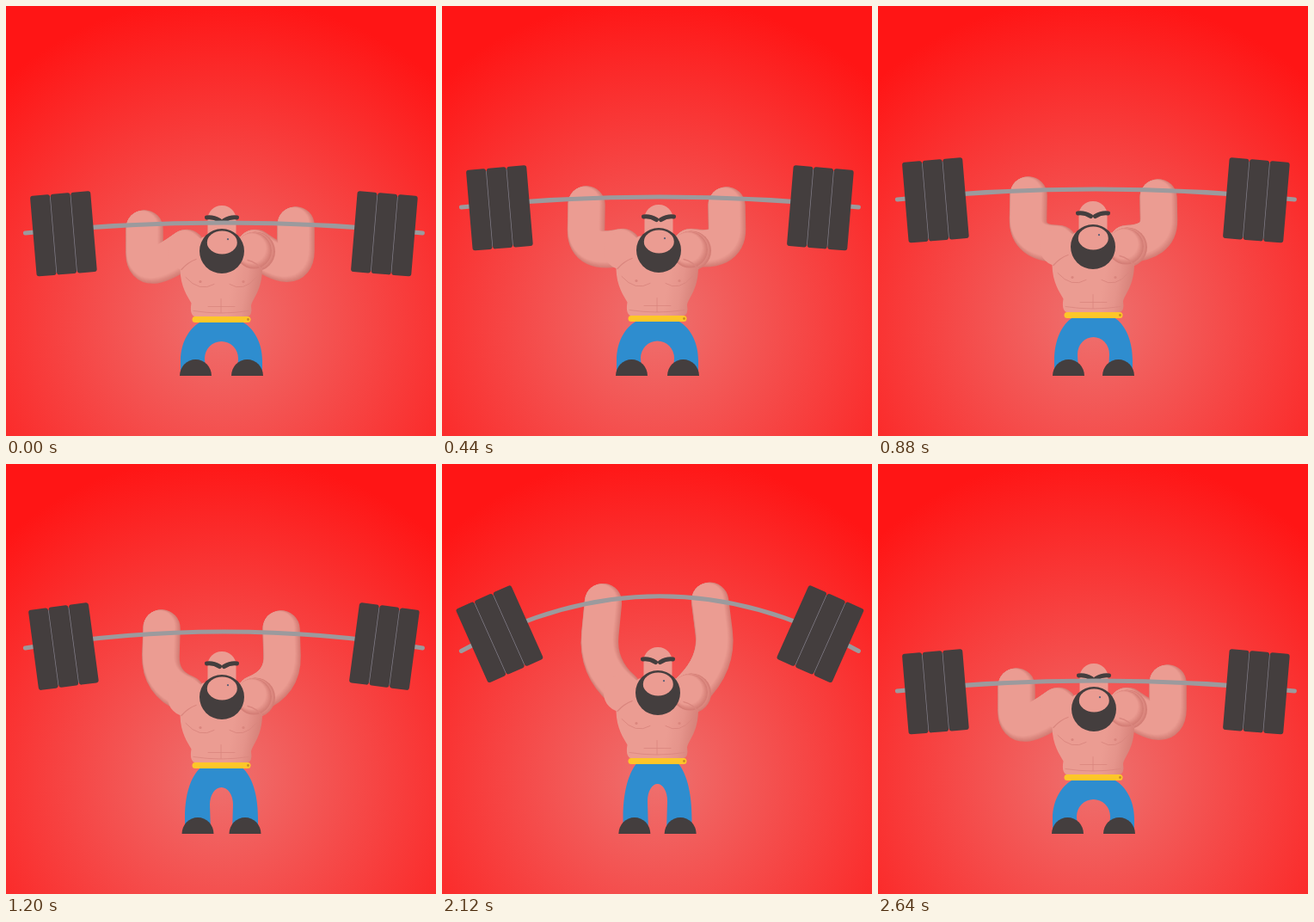
Animation of 500 by 500 pixels, one loop 2.68 s. Source, as an HTML page with a canvas:

```html
<!DOCTYPE html>
<html lang="en">
<head>
<meta charset="utf-8">
<title>Weightlifter</title>
<style>
html, body { margin: 0; width: 100%; height: 100%; overflow: hidden; background: #ff1616; }
canvas { display: block; width: 500px; height: 500px; }
</style>
</head>
<body>
<canvas id="stage" width="500" height="500"></canvas>
<script>
const ctx = document.getElementById('stage').getContext('2d');
const LOOP = 2680, STEP = 40;
const DARK = '#443e3e', BLUE = '#2e8dcf', STEEL = '#9c9a9d', YELLOW = '#fdc629';
const SKIN = [235, 156, 146], SHADE = [211, 125, 117];
const BAR_X = 253.4, BAR_HALF = 231;

// belt, bar middle, bar end, left hand xy, left elbow xy, right hand xy, right elbow xy,
// thigh outer x, thigh inner x, crotch y, foot x, head x
const squat = [364.5, 252, 264, 161, 259, 161, 317, 337, 255, 337, 315, 203, 231, 390, 220.5, 251];
const press = [363.5, 222, 234, 168, 231, 167, 290, 331, 232, 332, 287, 203, 231, 389.5, 220.5, 252];
const strain = [359.5, 213, 225, 175, 220, 174, 276, 326, 223, 327, 275, 205, 232, 385, 221.5, 250];
const rise = [350.5, 195, 214, 181, 191, 179, 255, 320, 192, 322, 255, 208, 237, 376, 223, 251];
const lockout = [344.5, 148, 215, 189, 155, 181, 232, 310, 154, 320, 228, 211, 239.5, 371, 224, 251];
const drop = [360, 233, 253, 166, 239, 166, 299, 333, 234, 333, 296, 204.5, 232, 385.5, 221.5, 251];

const keys = [[0, squat], [440, press], [880, strain], [1200, rise], [1600, lockout],
  [2080, lockout], [2320, drop], [2640, squat], [LOOP, squat]];

const rgb = c => `rgb(${c.map(Math.round)})`;
const mix = (a, b, k) => a.map((v, i) => v + (b[i] - v) * k);

// Monotone cubic interpolation through the key poses
function slope(i, n) {
  if (i === 0 || i === keys.length - 1) return 0;
  const secant = j => (keys[j + 1][1][n] - keys[j][1][n]) / (keys[j + 1][0] - keys[j][0]);
  const a = secant(i - 1), b = secant(i);
  return a * b > 0 ? 2 * a * b / (a + b) : 0;
}

function poseAt(t) {
  let i = 0;
  while (i < keys.length - 2 && t >= keys[i + 1][0]) i++;
  const [t0, a] = keys[i], [t1, b] = keys[i + 1];
  const h = t1 - t0, u = (t - t0) / h, v = 1 - u;
  return a.map((p, n) =>
    p * (1 + 2 * u) * v * v + b[n] * u * u * (3 - 2 * u) +
    h * (slope(i, n) * u * v * v - slope(i + 1, n) * u * u * v));
}

function ellipse(x, y, rx, ry, color) {
  ctx.fillStyle = color;
  ctx.beginPath();
  ctx.ellipse(x, y, rx, ry, 0, 0, Math.PI * 2);
  ctx.fill();
}

function box(x, y, w, h, r, color) {
  ctx.fillStyle = color;
  ctx.beginPath();
  ctx.roundRect(x, y, w, h, r);
  ctx.fill();
}

function strokePath(d, width, color) {
  ctx.lineWidth = width;
  ctx.strokeStyle = color;
  ctx.stroke(new Path2D(d));
}

// Repeats a shape slightly smaller and towards the light for a soft lower-right edge
function shaded(draw) {
  for (let i = 0; i <= 7; i++) {
    const inset = i * 0.55;
    ctx.save();
    ctx.translate(-inset * 0.7, -inset * 0.7);
    draw(inset, rgb(mix(SHADE, SKIN, i / 7)));
    ctx.restore();
  }
}

function background() {
  const g = ctx.createRadialGradient(250, 364, 0, 250, 364, 375);
  g.addColorStop(0, '#ee716f');
  g.addColorStop(1, '#ff1515');
  ctx.fillStyle = g;
  ctx.fillRect(0, 0, 500, 500);
}

function legs(belt, outer, inner, crotch, foot) {
  const m = x => 501 - x;
  const rx = 250.5 - inner;
  ctx.fillStyle = BLUE;
  ctx.fill(new Path2D(`M226 ${belt + 3}
    C${outer + 10} ${belt + 10} ${outer} ${belt + 27} ${outer} 412 V428 H${inner + 1}
    L${inner} ${crotch + 20} A${rx} 20 0 0 1 ${m(inner)} ${crotch + 20}
    L${m(inner) - 1} 428 H${m(outer)} V412
    C${m(outer)} ${belt + 27} ${m(outer) - 10} ${belt + 10} 275 ${belt + 3}Z`));
  ctx.fillStyle = DARK;
  for (const x of [foot, m(foot)]) {
    ctx.beginPath();
    ctx.ellipse(x, 430, 18.5, 19, 0, Math.PI, 0);
    ctx.fill();
  }
}

function arm(hx, hy, ex, ey, sx, sy) {
  const d = `M${hx} ${hy} L${(hx + ex) / 2} ${(hy + ey) / 2} Q${ex} ${ey} ${sx} ${sy}`;
  shaded((inset, color) => strokePath(d, 43.5 - inset * 2, color));
}

function torso(belt) {
  ctx.save();
  ctx.translate(0, belt);
  ellipse(210, -79, 22, 22, rgb(SKIN));
  shaded((inset, color) => ellipse(290, -79, 23 - inset, 23 - inset, color));
  const side = ctx.createLinearGradient(264, -50, 300, -44);
  side.addColorStop(0, rgb(SKIN));
  side.addColorStop(0.45, rgb(mix(SKIN, SHADE, 0.25)));
  side.addColorStop(1, rgb(SHADE));
  ctx.fillStyle = side;
  ctx.fill(new Path2D(`M208 -80 L202.5 -58 C203 -38 211 -27 215.5 -19 Q213 -4 221 -3
    H280 Q287 -4 285 -16 C287 -25 298 -34 298 -60 L290 -80 L272 -96 H229Z`));
  shaded((inset, color) => ellipse(288, -80, 21 - inset, 21 - inset, color));

  const line = rgb(mix(SKIN, SHADE, 0.7));
  strokePath('M204 -58 Q212 -67 221 -70 M281 -69 Q292 -66 298 -58', 1.3, line);
  strokePath('M209 -49 Q225 -31 242 -41 M260 -41 Q276 -31 291 -49', 0.9, line);
  strokePath('M250 -24 V-8 M235 -15 H266 M218 -10 Q250 -5 282 -10', 0.8, line);
  ellipse(226, -44, 1.6, 1.6, line);
  ellipse(276, -44, 1.6, 1.6, line);
  box(216.5, -3.5, 68, 7, 3.5, YELLOW);
  ellipse(281.5, 0, 1.4, 1.4, '#c58f25');
  ctx.restore();
}

function head(x, belt) {
  ctx.save();
  ctx.translate(x, belt);
  box(-16.5, -132.5, 33, 48, 16, rgb(SKIN));
  strokePath('M-17.5 -118.5 Q-10 -119.5 -2.5 -115 M17.5 -118.5 Q10 -119.5 2.5 -115', 5, DARK);
  ctx.restore();
}

function beard(x, belt) {
  ctx.save();
  ctx.translate(x, belt);
  ellipse(0, -79.5, 26, 26, DARK);
  ellipse(0.3, -89.5, 17.5, 13.5, rgb(SKIN));
  ellipse(7, -93.3, 1.1, 1.1, '#5c6078');
  ctx.restore();
}

function barbell(mid, end) {
  const bend = end - mid;
  strokePath(`M${BAR_X - BAR_HALF} ${end} Q${BAR_X} ${mid - bend} ${BAR_X + BAR_HALF} ${end}`, 5, STEEL);
  const reach = 186.5, u = reach / BAR_HALF;
  const y = mid + bend * u * u + 5 - 0.05 * (bend - 12);
  const tilt = Math.atan(2 * bend * u / BAR_HALF);
  for (const side of [-1, 1]) {
    ctx.save();
    ctx.translate(BAR_X + side * reach, y);
    ctx.rotate(side * tilt);
    box(-34, -44, 68, 88, 2, '#85808c');
    for (const x of [-35.2, -11.5, 12.2]) box(x, -47, 23, 94, 3, DARK);
    ctx.restore();
  }
}

function render(t) {
  const [belt, mid, end, lhx, lhy, lex, ley, rhx, rhy, rex, rey,
    outer, inner, crotch, foot, headX] = poseAt(t);
  background();
  ctx.lineCap = 'round';
  ctx.lineJoin = 'round';
  legs(belt, outer, inner, crotch, foot);
  arm(lhx, lhy, lex, ley, 210, belt - 83);
  arm(rhx, rhy, rex, rey, 290, belt - 83);
  torso(belt);
  head(headX, belt);
  barbell(mid, end);
  beard(headX, belt);
}

const start = performance.now();
function tick() {
  const t = (performance.now() - start) % LOOP;
  render(Math.floor(t / STEP) * STEP);
  requestAnimationFrame(tick);
}
tick();
</script>
</body>
</html>
```
